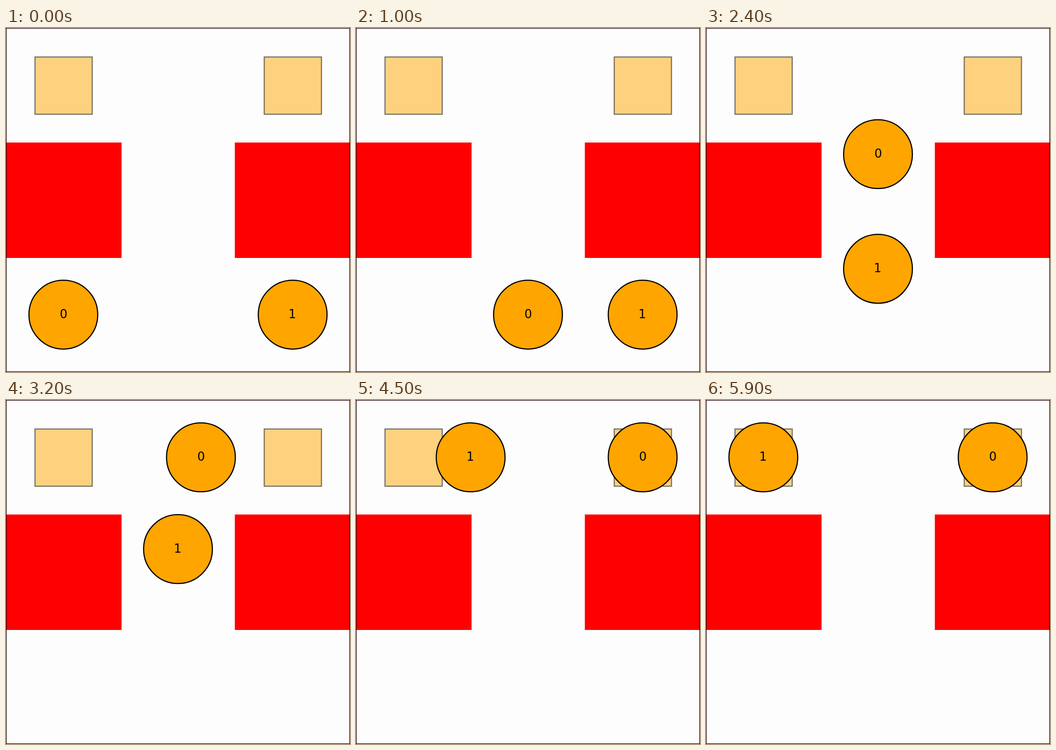
An HTML page for the animation above (6 s loop, 748 by 748 pixels).

```html
<!DOCTYPE html>
<html>
<head>
<meta charset="utf-8">
<style>
  html, body { margin: 0; width: 100%; height: 100%; overflow: hidden; background: #fdfdfd; }
  svg { display: block; width: 100vw; height: 100vh; }
  .goal { fill: orange; stroke: #000; stroke-width: 2.5; opacity: 1; fill-opacity: .5; stroke-opacity: .5; }
  .wall { fill: #fe0000; }
  .agent circle { fill: orange; stroke: #000; stroke-width: 2.5; }
  .agent text { font: 26px "DejaVu Sans", sans-serif; text-anchor: middle; }
  .frame { fill: none; stroke: #200000; stroke-width: 2.5; }
</style>
</head>
<body>
<svg viewBox="0 0 748 748">
  <rect class="goal" x="63" y="63" width="124.5" height="124.5"/>
  <rect class="goal" x="561.5" y="63" width="124.5" height="124.5"/>
  <rect class="wall" x="0" y="249" width="251.3" height="251"/>
  <rect class="wall" x="497.6" y="249" width="250.4" height="251"/>
  <rect class="frame" width="748" height="748"/>
  <g class="agent"><circle r="74.8"/><text x=".5" y="7.6">0</text></g>
  <g class="agent"><circle r="74.8"/><text x="-.7" y="7.6">1</text></g>
</svg>
<script>
  const CELL = 748 / 3, STEP = 100, MOVE = 1000, LOOP = 6000;
  // Grid cells [column, row] visited, one per second
  const routes = [
    [[0, 2], [1, 2], [1, 1], [1, 0], [2, 0], [2, 0], [2, 0]],
    [[2, 2], [2, 2], [1, 2], [1, 1], [1, 0], [0, 0], [0, 0]],
  ];
  const agents = document.querySelectorAll('.agent');

  function draw(now) {
    const time = Math.floor((now % LOOP) / STEP) * STEP;
    const leg = Math.floor(time / MOVE);
    const part = (time % MOVE) / MOVE;
    routes.forEach((route, i) => {
      const [x, y] = route[leg].map((from, axis) =>
        (from + (route[leg + 1][axis] - from) * part + 0.5) * CELL);
      agents[i].setAttribute('transform', `translate(${x} ${y})`);
    });
  }

  const start = performance.now();
  function tick() {
    draw(performance.now() - start);
    requestAnimationFrame(tick);
  }
  tick();
</script>
</body>
</html>
```
